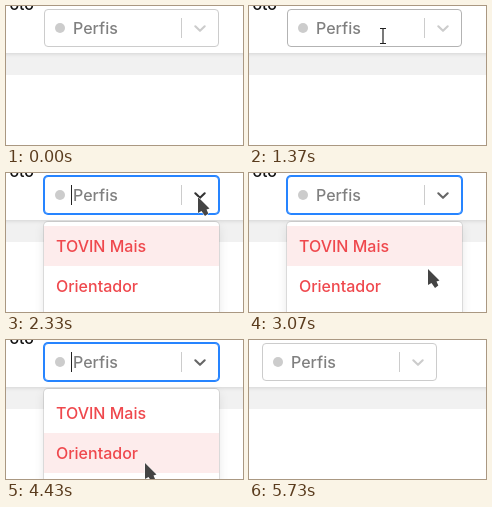
Animation, 237 px wide and 139 px high, one loop 5860 ms. Source, as an HTML page:

```html
<!DOCTYPE html>
<html lang="pt">
<head>
<meta charset="utf-8">
<style>
  html, body { margin: 0; width: 100%; height: 100%; overflow: hidden; background: #fff; }
  #stage { position: absolute; left: 0; top: 0; width: 237px; height: 139px; overflow: hidden;
    font: 500 16px/24px Inter, sans-serif; cursor: none; }
  #stage div, #stage span, #stage svg { position: absolute; box-sizing: border-box; white-space: nowrap; }
  #band { left: 0; top: 40px; width: 237px; height: 29px; background: #f1f1f1; }
  #card { left: -10px; top: -10px; width: 257px; height: 57px; background: #fff;
    box-shadow: 0 1px 4px rgba(0, 0, 0, .13); }
  #form { left: 0; top: 0; width: 237px; height: 139px; }
  #label { right: 209px; top: -14px; color: #111; }
  #control { left: 38px; top: 3px; width: 175px; height: 38px; background: #fff;
    border: 1px solid #ccc; border-radius: 4px; }
  #control.hover { border-color: #b3b3b3; }
  #control.focus { border-color: #2684ff; box-shadow: 0 0 0 1px #2684ff; }
  #bullet { left: 49px; top: 17px; width: 10px; height: 10px; border-radius: 50%; background: #ccc; }
  #hint { left: 67px; top: 10px; color: #808080; }
  #caret { left: 65px; top: 12px; width: 1px; height: 20px; background: #222; }
  #rule { left: 175px; top: 12px; width: 1px; height: 20px; background: #ccc; }
  #chevron { left: 184px; top: 12px; }
  .dot { top: 20px; width: 4px; height: 4px; border-radius: 50%; background: #ccc; }
  #menu { left: 38px; top: 49px; width: 175px; height: 100px; background: #fff; border-radius: 4px;
    box-shadow: 0 0 0 1px rgba(0, 0, 0, .1), 0 4px 11px rgba(0, 0, 0, .1); }
  .option { left: 0; width: 175px; height: 40px; padding: 8px 12px; color: #ef484d; }
  .option.on { background: #fdecec; }
  #arrow, #beam { left: 0; top: 0; overflow: visible; }
</style>
</head>
<body>
<div id="stage">
  <div id="band"></div>
  <div id="card"></div>
  <div id="form">
    <span id="label">Foto</span>
    <div id="control"></div>
    <div id="bullet"></div>
    <span id="hint">Perfis</span>
    <div id="caret"></div>
    <div class="dot" style="left:143px"></div>
    <div class="dot" style="left:151px"></div>
    <div class="dot" style="left:159px"></div>
    <div id="rule"></div>
    <svg id="chevron" width="20" height="20" fill="none" stroke-width="2.1" stroke-linecap="round" stroke-linejoin="round">
      <path d="M5.3 8.3L10 12.8L14.7 8.3"/>
    </svg>
    <div id="menu">
      <div class="option" style="top:4px">TOVIN Mais</div>
      <div class="option" style="top:44px">Orientador</div>
    </div>
  </div>
  <svg id="arrow" width="14" height="22">
    <path d="M0 0V16L3.5 14L7 19L10.3 16.6L8.5 12.4L11.5 11.5Z" fill="#444" stroke="#fff" paint-order="stroke"/>
  </svg>
  <svg id="beam" width="8" height="18" fill="none">
    <path d="M-3 -7.5H3M-3 7.5H3M0 -7.5V7.5" stroke="#fff" stroke-width="3"/>
    <path d="M-3 -7.5H3M-3 7.5H3M0 -7.5V7.5" stroke="#222" stroke-width="1.2"/>
  </svg>
</div>
<script>
  const LOOP = 5860, ENTER = 670, OPEN = 2030, PICK = 4700, RELOAD = 5030, LOADED = 5230, LEAVE = 5700;
  const SHIFT = 25;
  const $ = id => document.getElementById(id);
  const dots = document.querySelectorAll('.dot');
  const options = document.querySelectorAll('.option');

  // The pointer rests between these moves
  const moves = [
    { from: ENTER, to: 1040, x: 175, y: 13 },
    { from: 1040, to: 1230, x: 122, y: 33 },
    { from: 1270, to: 1530, x: 152, y: 24 },
    { from: OPEN, to: 2330, x: 192, y: 24 },
    { from: 2630, to: 3070, x: 179, y: 96 },
    { from: 3070, to: 3470, x: 139, y: 123 },
    { from: PICK, to: 5070, x: 88, y: 23 },
    { from: 5330, to: LEAVE, x: -6, y: 6 }
  ];

  const clamp = k => Math.min(1, Math.max(0, k));
  const smooth = k => k * k * (3 - 2 * k);

  function pointer(t) {
    let x = 17, y = 139;
    for (const m of moves) {
      const k = clamp((t - m.from) / (m.to - m.from));
      x += (m.x - x) * k;
      y += (m.y - y) * k;
    }
    return { x: Math.round(x), y: Math.round(y) };
  }

  // Dots stay solid until their delay is over, then pulse
  function pulse(age) {
    if (age < 0) return 1;
    return smooth(clamp(1 - Math.abs(age % 1000 / 400 - 1)));
  }

  const show = (el, on) => { el.style.visibility = on ? 'visible' : 'hidden'; };

  function draw(t) {
    const { x, y } = pointer(t);
    const present = t >= ENTER && t < LEAVE;
    const focus = t >= OPEN && t < RELOAD;
    const shift = t >= RELOAD ? SHIFT : 0;
    const inside = x + shift - 38;
    const over = present && y >= 3 && y < 41 && inside >= 0 && inside < 175;
    const onChevron = over && inside > 137;
    const onText = over && !onChevron;

    $('form').style.transform = `translateX(${-shift}px)`;
    show($('label'), t < LEAVE);
    $('control').className = focus ? 'focus' : over ? 'hover' : '';
    show($('caret'), focus && (t - OPEN) % 1200 < 600);
    $('chevron').style.stroke = focus ? (onChevron ? '#333' : '#666') : '#ccc';

    show($('menu'), t >= OPEN && t < PICK);
    options[0].classList.toggle('on', y <= 97);
    options[1].classList.toggle('on', y > 97);

    const loading = t >= RELOAD && t < LOADED;
    dots.forEach((d, i) => { d.style.opacity = loading ? pulse(t - RELOAD - i * 160) : 0; });

    show($('arrow'), present && !onText);
    show($('beam'), onText);
    $('arrow').style.transform = $('beam').style.transform = `translate(${x}px, ${y}px)`;
  }

  const start = performance.now();
  function tick() {
    draw((performance.now() - start) % LOOP);
    requestAnimationFrame(tick);
  }
  tick();
</script>
</body>
</html>
```
